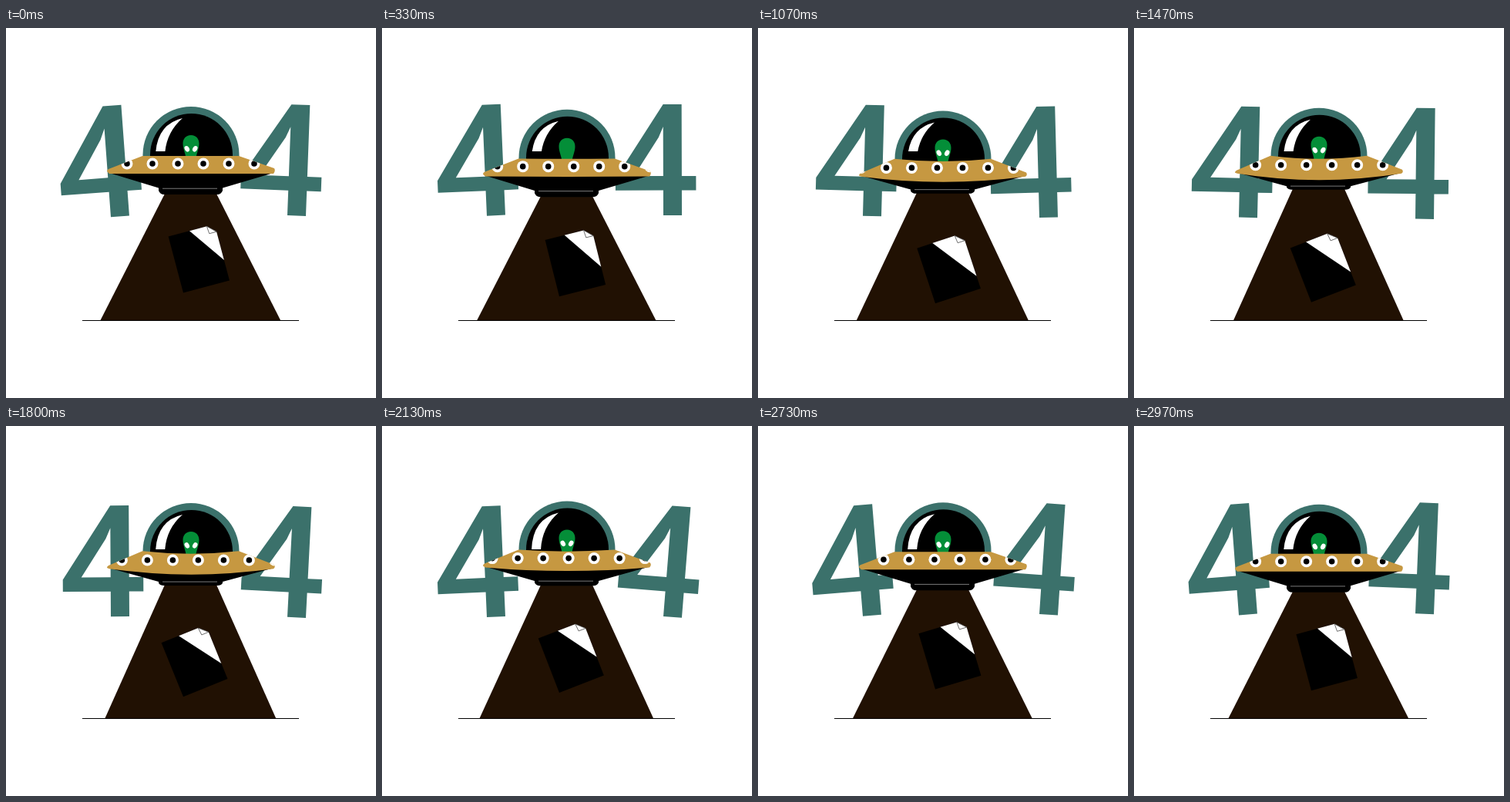
These frames come from a looping animation (480x480 px, 3 s). An HTML page:

```html
<!DOCTYPE html>
<html lang="en">
<head>
<meta charset="utf-8">
<title>404</title>
<style>
html, body { margin: 0; width: 100%; height: 100%; overflow: hidden; background: #fff; }
svg { display: block; width: 100vw; height: 100vh; }
</style>
</head>
<body>
<svg viewBox="0 0 480 480" role="img" aria-label="404">
  <defs>
    <path id="four" fill="#3b716b" fill-rule="evenodd"
      d="M0-144H24V-51H42.500V-32.500H24V0H0V-32.500H-62V-48ZM0-51V-115Q-3-108-6-101L-38-51Z"/>
    <g id="lamp"><circle r="7.500" fill="#fff"/><circle r="3.800"/></g>
    <clipPath id="rimClip"><path id="rimShape"/></clipPath>
    <clipPath id="shineClip"><path d="M0 0H480V160H0Z"/></clipPath>
  </defs>

  <use id="left" href="#four"/>
  <use id="right" href="#four"/>
  <path id="beam" fill="#211103"/>
  <path d="M99 379.500H380" stroke="#000"/>

  <g id="paper">
    <path d="M0 0V-75.500H51.500L62-65.500V0Z"/>
    <path id="blank" fill="#fff"/>
    <path d="M51.500-75.500L52.300-65.500H62Z" fill="#fff" stroke="#444" stroke-width=".7"/>
  </g>

  <g class="ship">
    <path d="M177.500 172V164.500A62.500 62.500 0 0 1 302.500 164.500V172Z" fill="#3b716b"/>
    <path d="M187 174V164.500A53.500 53.500 0 0 1 294 164.500V174Z"/>
  </g>
  <g clip-path="url(#shineClip)">
    <path class="ship" d="M229 117Q195 125 194 166H206Q207 136 229 117Z" fill="#fff"/>
  </g>
  <g class="ship">
    <path d="M240 139C233 139 229.500 144 229.500 150C229.500 157 233 162 234.500 174H245.500C247 162 250.500 157 250.500 150C250.500 144 247 139 240 139Z" fill="#048e38"/>
    <g id="eyes" fill="#fff">
      <ellipse rx="2.900" ry="4" transform="translate(-5.200) rotate(-30)"/>
      <ellipse rx="2.900" ry="4" transform="translate(5.200) rotate(30)"/>
    </g>
    <path id="hull"/>
    <path id="seam" stroke="#888" stroke-width=".9"/>
    <path id="rim" fill="#c69841"/>
    <g clip-path="url(#rimClip)"><g id="lamps"></g></g>
  </g>
</svg>
<script>
const LOOP = 3000, GAP = 33;
const $ = id => document.getElementById(id);
const set = (id, name, value) => $(id).setAttribute(name, value);
const ships = document.querySelectorAll('.ship');

for (let i = 0; i < 8; i++)
  $('lamps').innerHTML += `<use href="#lamp" x="${i * GAP}"/>`;

function draw(t) {
  // Cosine over one loop, highest at the given time
  const wave = peak => Math.cos(2 * Math.PI * (t - peak) / LOOP);

  const lift = 0.7 + 5.5 * wave(810);
  const tilt = Math.max(0, 0.45 + 0.55 * wave(1460));
  const sway = wave(1160);

  set('left', 'transform',
    `translate(136 ${245.5 - 2.6 * wave(700)}) rotate(${-1.5 + 3.2 * wave(1230)})`);
  set('right', 'transform',
    `translate(365 ${245.4 + 2.5 * wave(1700)}) rotate(${1.5 + 3.4 * wave(2340)})`);

  const base = 216 - 8 * tilt;
  const half = 113.7 + 3.3 * wave(0);
  set('beam', 'd', `M206 ${base + lift - 1}H273L${239.3 + half} 379.500H${239.3 - half}Z`);

  set('paper', 'transform',
    `translate(230 ${349.5 + 8 * sway}) rotate(${-18.1 + 4 * wave(300)})`);
  set('blank', 'd',
    `M${25.2 - 4.2 * sway}-75.500H51.500L62-65.500V${-23 + 6 * sway}Z`);

  for (const s of ships) s.setAttribute('transform', `translate(0 ${lift})`);

  const edge = 189 - 2 * tilt, top = 166 - 2 * tilt;
  const rim = `M131 186Q131 184 133 183L177 ${top}Q240 ${166 + 6 * tilt} 302 ${top}` +
    `L348 182Q350 185 347 ${edge}Q240 ${189 + 15 * tilt} 134 ${edge}Z`;
  set('rim', 'd', rim);
  set('rimShape', 'd', rim);

  const neck = 207.5 - 4 * tilt, foot = 211 - 6 * tilt;
  set('hull', 'd', `M134 ${edge - 1}L198 ${neck}V${foot}Q200 ${base} 205 ${base}` +
    `H274Q279 ${base} 281 ${foot}V${neck}L347 ${edge - 1}Z`);
  set('seam', 'd', `M203 ${208.2 - 4.8 * tilt}H274`);

  set('lamps', 'transform', `translate(${124 - (t * 2 * GAP / LOOP) % GAP} 176)`);
  const open = Math.min(1, Math.max(0, (Math.abs(t - 335) - 20) / 70));
  set('eyes', 'transform', `translate(240 156.800) scale(1 ${open})`);
}

function tick() {
  draw(performance.now() % LOOP);
  requestAnimationFrame(tick);
}
tick();
</script>
</body>
</html>
```
